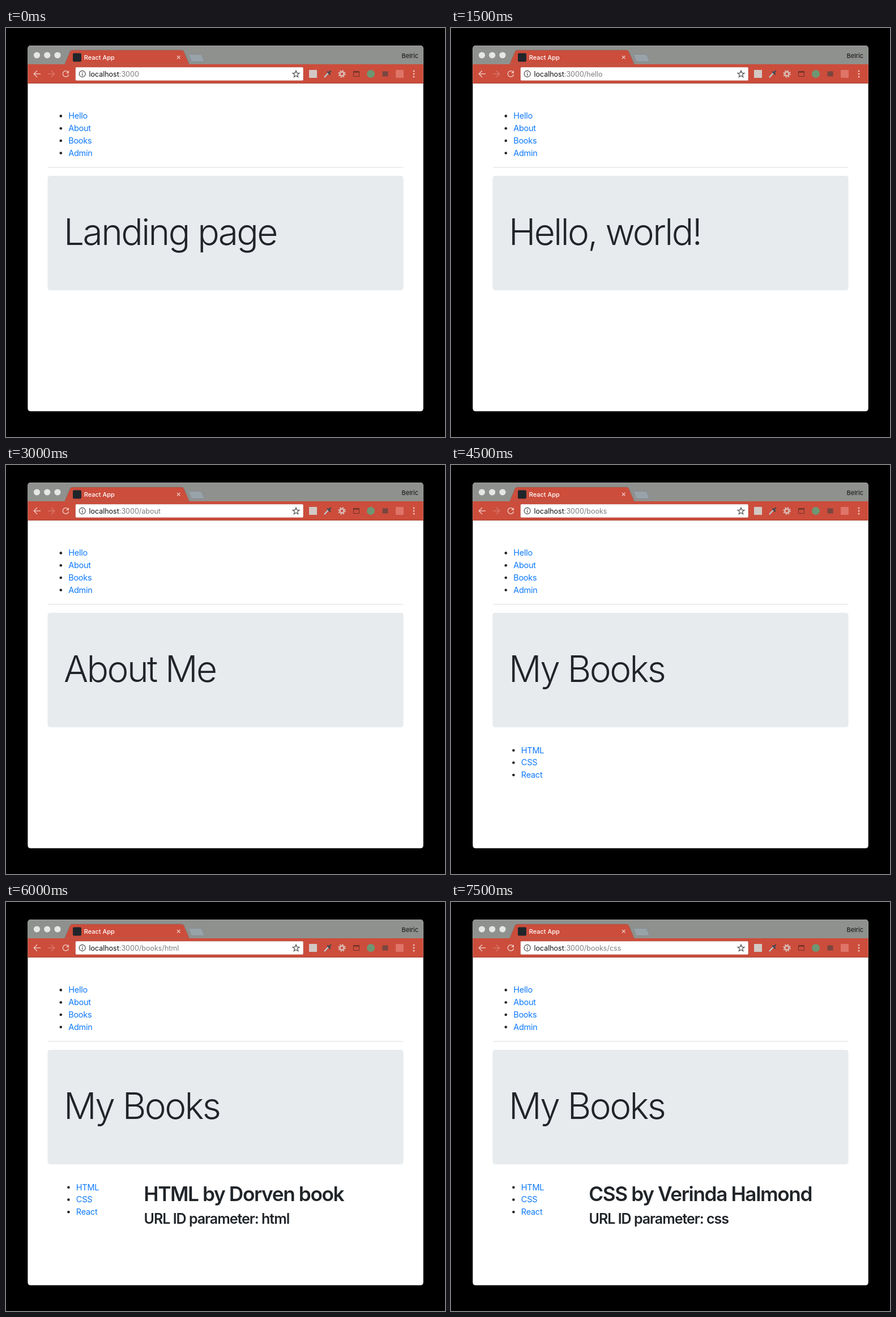
Write an HTML page that moves like this. It is 775 by 722 pixels and loops after 8 s.

```html
<!DOCTYPE html>
<html lang="en">
<head>
<meta charset="utf-8">
<title>Routed pages</title>
<style>
  html, body { margin: 0; width: 100%; height: 100%; overflow: hidden; background: #000; }
  svg { display: block; width: 100%; height: 100%; }
  text { font-family: Inter, "Open Sans", sans-serif; font-optical-sizing: none; fill: #212529; white-space: pre; }
  .ui { font-size: 11px; }
  .url { font-size: 12.5px; }
  .link { font-size: 14.5px; fill: #0f79fd; letter-spacing: -.018em; }
  .display { font-size: 64px; font-weight: 300; letter-spacing: -.04em; }
  .title { font-size: 35.2px; font-weight: 600; letter-spacing: -.039em; }
  .sub { font-size: 25px; font-weight: 600; letter-spacing: -.04em; }
  .line { fill: none; stroke-width: 1.5; }
</style>
</head>
<body>
<svg viewBox="0 0 775 722">
  <defs>
    <clipPath id="frame"><rect x="38.4" y="31" width="698.3" height="645.6" rx="5"/></clipPath>
  </defs>
  <rect width="775" height="722" fill="#000"/>
  <g clip-path="url(#frame)">
    <rect x="38" y="31" width="699" height="646" fill="#fefffe"/>
    <rect x="38" y="31" width="699" height="33" fill="#8f918e"/>
    <rect x="38" y="31" width="699" height="1" fill="#a3a5a2"/>
    <g fill="#e6e7e5">
      <circle cx="54.5" cy="48" r="5.6"/>
      <circle cx="72.7" cy="48" r="5.6"/>
      <circle cx="91" cy="48" r="5.6"/>
    </g>
    <path d="M322 46.5H343Q345 46.5 346 48.5L350.5 59.5H329.5Q327.5 59.5 326.5 57.5Z" fill="#98a2a9" stroke="#838a8e" stroke-width=".8"/>
    <path d="M103.5 64L113 41.5Q114 39 117 39H310Q313 39 314 41.5L323.5 64Z" fill="#cc4d3c" stroke="#85716d" stroke-width=".8"/>
    <rect x="38" y="64" width="699" height="34" fill="#cc4d3c"/>
    <rect x="38" y="97" width="699" height="1" fill="#a94334"/>
    <rect x="118" y="44.5" width="15" height="15" rx="2" fill="#20262b"/>
    <text class="ui" x="137.7" y="55.5" style="fill:#fff;font-weight:500">React App</text>
    <path class="line" d="M302 49L307.5 54.5M307.5 49L302 54.5" stroke="#f0c9c2" style="stroke-width:1.2"/>
    <text class="ui" x="728" y="52.5" text-anchor="end" style="fill:#111">Belric</text>

    <g class="line">
      <path d="M61 81H49.5M55 75.3L49.3 81L55 86.7" stroke="#ecc0b9"/>
      <path d="M74 81H85.5M80 75.3L85.7 81L80 86.7" stroke="#da7668"/>
      <path d="M109.3 77.3A5.2 5.2 0 1 0 110.6 82" stroke="#ecc0b9"/>
    </g>
    <path d="M111 75V80H106Z" fill="#ecc0b9"/>

    <rect x="122.5" y="69" width="402.5" height="24" rx="2" fill="#fff" stroke="#b34636" stroke-width=".6"/>
    <circle class="line" cx="134.7" cy="81" r="5.5" stroke="#565856" style="stroke-width:1.3"/>
    <path d="M134 78H135.4V79.4H134ZM134 80.4H135.4V84.2H134Z" fill="#565856"/>
    <text class="url" x="146.4" y="86" style="fill:#111">localhost<tspan id="path" fill="#7b7d7b"></tspan></text>
    <path id="star" class="line" stroke="#565856" style="stroke-width:1.3"/>

    <rect x="535" y="74" width="14" height="14" fill="#d2c9c5"/>
    <path d="M562.5 86.5L569 79.5" stroke="#b9cbd2" stroke-width="2.2" stroke-linecap="round"/>
    <path d="M568 77.5L572 81.5M570.5 79L573 76" stroke="#444a50" stroke-width="2.5" stroke-linecap="round"/>
    <g fill="none" stroke="#d9b9b2">
      <circle cx="593" cy="81" r="5.8" stroke-width="2" stroke-dasharray="2.28 2.28"/>
      <circle cx="593" cy="81" r="3.6" stroke-width="2.8"/>
    </g>
    <path d="M613.5 77H623.5V85.5H613.5Z" fill="none" stroke="#703329"/>
    <path d="M613 77.5H624" stroke="#703329" stroke-width="2.5"/>
    <circle cx="644" cy="81" r="7" fill="#6f9673"/>
    <rect x="664.5" y="76.5" width="10" height="9" fill="#79463f"/>
    <rect x="688" y="74" width="14" height="14" rx="1.5" fill="#df7468"/>
    <g fill="#edc3bb">
      <circle cx="720" cy="76" r="1.5"/>
      <circle cx="720" cy="81" r="1.5"/>
      <circle cx="720" cy="86" r="1.5"/>
    </g>

    <g id="menu"></g>
    <rect x="74" y="245.3" width="627.5" height="1.2" fill="#e3e4e3"/>
    <rect x="73.5" y="261" width="628" height="202" rx="4.5" fill="#e7ebee"/>
    <text id="heading" class="display" x="102" y="383"></text>
    <g id="books"></g>
    <text id="title" class="title" x="243.3" y="528"></text>
    <text id="sub" class="sub" x="243.5" y="567.5"></text>
  </g>
</svg>
<script>
const STEP = 1500, LOOP = 8000;
const $ = id => document.getElementById(id);

const pages = [
  { path: "", heading: "Landing page" },
  { path: "/hello", heading: "Hello, world!" },
  { path: "/about", heading: "About Me" },
  { path: "/books", heading: "My Books" },
  { path: "/books/html", heading: "My Books", title: "HTML by Dorven book", id: "html" },
  { path: "/books/css", heading: "My Books", title: "CSS by Verinda Halmond", id: "css" }
];

function list(items, x, y) {
  return items.map((item, i) => {
    const base = y + i * 21.8;
    return `<circle cx="${x - 13.4}" cy="${base - 4.8}" r="2.3" fill="#212529"/>
      <text class="link" x="${x}" y="${base}">${item}</text>`;
  }).join("");
}

function starPath(cx, cy, outer, inner) {
  const points = Array.from({ length: 10 }, (_, i) => {
    const angle = i * Math.PI / 5 - Math.PI / 2;
    const r = i % 2 ? inner : outer;
    return `${cx + r * Math.cos(angle)} ${cy + r * Math.sin(angle)}`;
  });
  return `M${points.join("L")}Z`;
}

$("star").setAttribute("d", starPath(512, 81.5, 6.2, 2.7));
$("menu").innerHTML = list(["Hello", "About", "Books", "Admin"], 110.2, 160.2);
$("books").innerHTML = list(["HTML", "CSS", "React"], 123.8, 508.5);

let shown = -1;
function render(time) {
  const index = Math.floor(time % LOOP / STEP);
  if (index === shown) return;
  shown = index;
  const { path, heading, title = "", id } = pages[index];
  $("path").textContent = ":3000" + path;
  $("heading").textContent = heading;
  $("books").style.display = path.startsWith("/books") ? "" : "none";
  $("title").textContent = title;
  $("sub").textContent = id ? `URL ID parameter: ${id}` : "";
}

let start;
function tick(now) {
  start ??= now;
  render(now - start);
  requestAnimationFrame(tick);
}
render(0);
requestAnimationFrame(tick);
</script>
</body>
</html>
```
